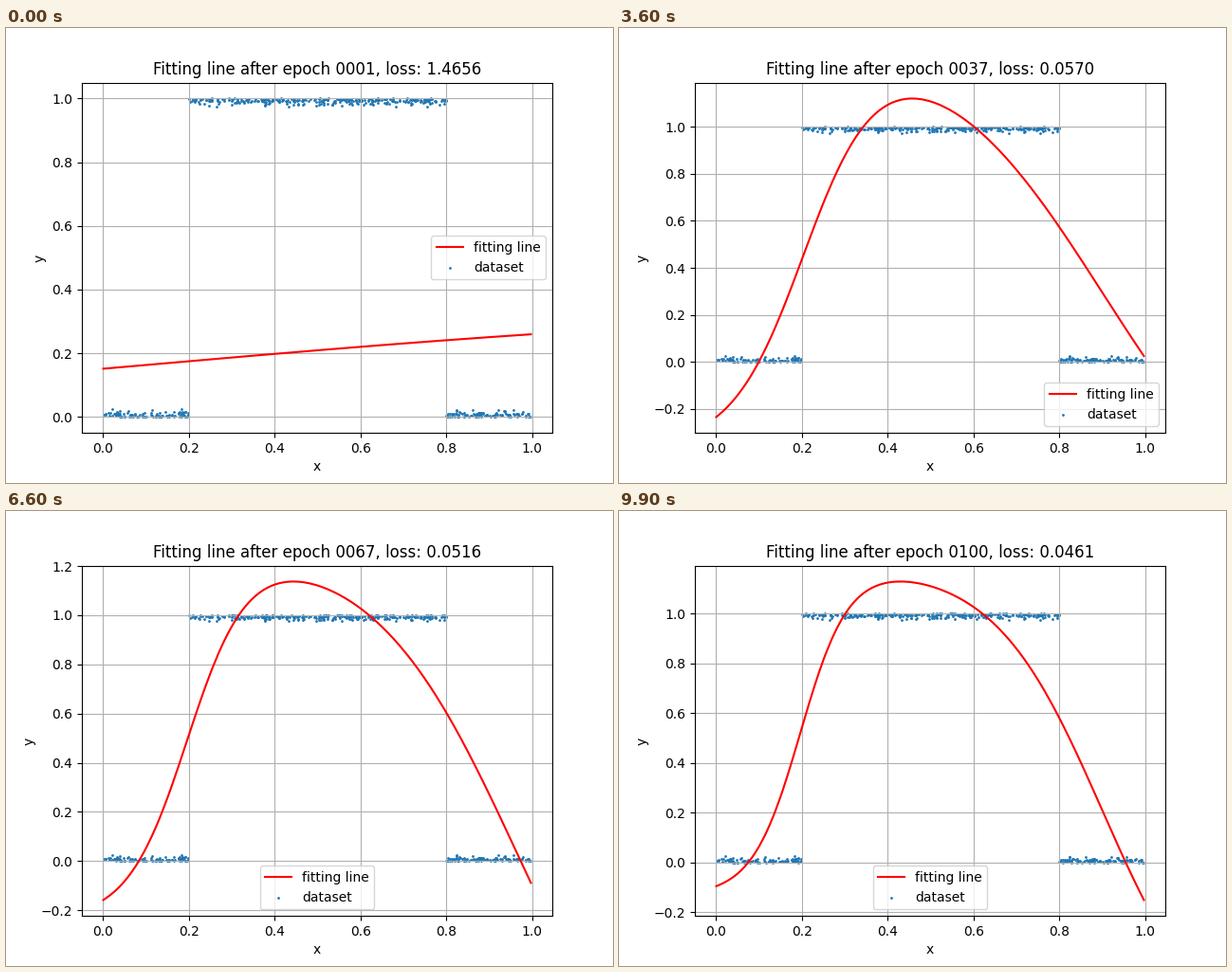
A matplotlib script that plays this animation: 640 px wide and 480 px high, repeating every 10 s.

```python
import numpy as np
import matplotlib.pyplot as plt
from matplotlib.animation import FuncAnimation

EPOCHS = 100

# Key poses of the two-unit tanh model:
# epoch, log loss, bias, (height, centre, width) of the rise, then of the fall
POSES = np.array([
    (1, np.log(1.4656), .157, .21, .045, 1.78, 0, .76, .39),
    (2, np.log(.262), .42, .25, .045, .6, 0, .76, .39),
    (14, np.log(.1860), .228, .525, .045, .27, .024, .76, .39),
    (22, np.log(.072), -.32, .945, .21, .173, .945, .745, .39),
    (27, np.log(.0626), -.324, .945, .212, .173, .945, .76, .39),
    (37, np.log(.0570), -.6, .897, .207, .171, 1.14, .9, .4),
    (56, np.log(.0531), -.895, .82, .2, .157, 1.42, 1, .39),
    (79, np.log(.0500), -.543, .7, .195, .122, 1.07, .925, .275),
    (100, np.log(.0461), -.453, .664, .197, .112, .985, .9, .253),
])


def make_dataset(n=500):
    rng = np.random.default_rng(7)
    x = np.sort(rng.uniform(.0003, .9975, n))
    x[0], x[-1] = .0003, .9975
    noise = np.minimum(np.abs(rng.normal(0, .01, n)), .025)
    inside = (x > .2) & (x < .8)
    return x, np.where(inside, 1 - noise, noise)


def pose_at(epoch):
    return [np.interp(epoch, POSES[:, 0], column) for column in POSES[:, 1:].T]


def step(x, height, centre, width):
    return height * np.tanh((x - centre) / width)


data_x, data_y = make_dataset()
fig, ax = plt.subplots(figsize=(6.4, 4.8), dpi=100)


def draw(i):
    epoch = i + 1
    log_loss, bias, *units = pose_at(epoch)
    fit = bias + step(data_x, *units[:3]) - step(data_x, *units[3:])

    ax.clear()
    ax.plot(data_x, fit, "r", label="fitting line")
    ax.scatter(data_x, data_y, s=1, label="dataset")
    ax.set_title(f"Fitting line after epoch {epoch:04d}, loss: {np.exp(log_loss):.4f}")
    ax.set_xlabel("x")
    ax.set_ylabel("y")
    ax.grid(True)
    ax.legend(loc="best")


anim = FuncAnimation(fig, draw, frames=EPOCHS, interval=100, repeat=True)
plt.show()
```
